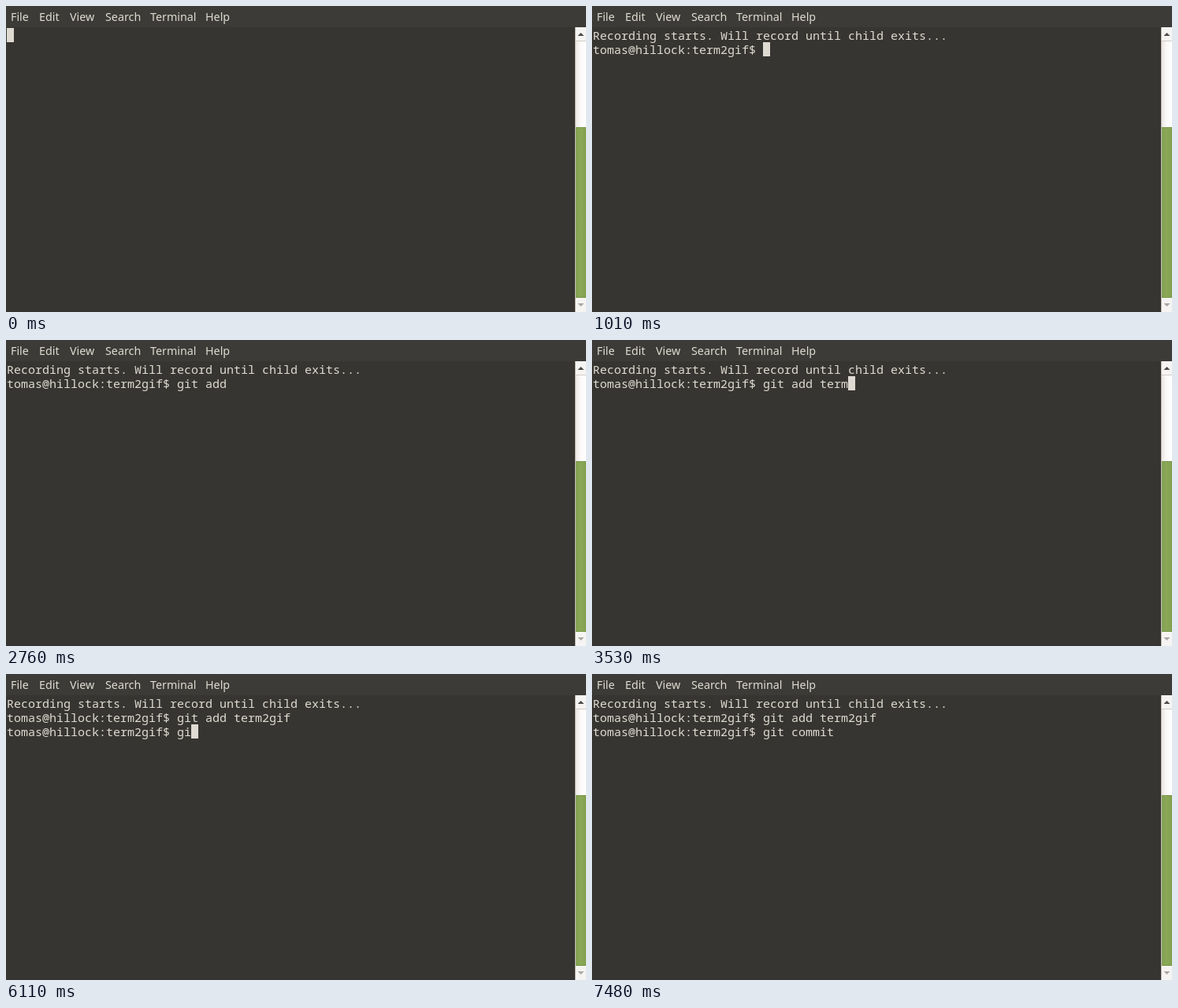
Write an HTML page with a canvas that moves like this. It is 736 by 389 pixels and loops after 8000 ms.

```html
<!DOCTYPE html>
<html lang="en">
<head>
<meta charset="utf-8">
<title>Terminal session</title>
<style>
  html, body { margin: 0; width: 100%; height: 100%; overflow: hidden; background: #373531; }
  canvas { display: block; }
</style>
</head>
<body>
<canvas id="stage" width="736" height="389"></canvas>
<script>
const ctx = document.getElementById('stage').getContext('2d');
const LOOP = 8000, CELL = 9, LINE = 18, LEFT = 1, TOP = 28;
const PROMPT = 'tomas@hillock:term2gif$ ';

// Time at which each piece of text reaches the screen
const output = [
  [40, 'Recording starts. Will record until child exits...\n'],
  [690, PROMPT],
  [1660, 'g'], [1800, 'i'], [1880, 't'], [2100, ' '],
  [2230, 'a'], [2420, 'd'], [2580, 'd'], [2670, ' '],
  [3100, 't'], [3280, 'e'], [3430, 'r'], [3530, 'm'], [4230, '2'], [4480, 'gif '],
  [5280, '\n' + PROMPT],
  [5960, 'g'], [6110, 'i'], [6180, 't'], [6240, ' '],
  [6460, 'c'], [6550, 'o'], [6640, 'm'], [6790, 'm'], [7310, 'i'], [7400, 't']
];

// The cursor starts visible and flips at each of these times
const blinks = [410, 1010, 1610, 2180, 2760, 3350, 3940, 4530, 5120, 5710, 6300, 6870, 7480];

const menu = [['File', 6], ['Edit', 42], ['View', 81], ['Search', 126], ['Terminal', 183], ['Help', 253]];

function rect(x, y, w, h, fill) {
  ctx.fillStyle = fill;
  ctx.fillRect(x, y, w, h);
}

function across(x0, x1, ...colors) {
  const g = ctx.createLinearGradient(x0, 0, x1, 0);
  colors.forEach((c, i) => g.addColorStop(i / (colors.length - 1), c));
  return g;
}

function arrow(y, dir, fill) {
  ctx.fillStyle = fill;
  ctx.beginPath();
  ctx.moveTo(725.5, y + 2 * dir);
  ctx.lineTo(733.5, y + 2 * dir);
  ctx.lineTo(729.5, y - 2 * dir);
  ctx.fill();
}

function drawMenu() {
  rect(0, 0, 736, 27, '#3c3b37');
  ctx.font = '14.3px "Noto Sans", "Open Sans", sans-serif';
  ctx.fillStyle = '#dfdbd2';
  for (const [label, x] of menu) ctx.fillText(label, x, 19);
}

function drawScrollbar() {
  rect(722, 27, 14, 362, across(722, 736, '#e9e3df', '#fbf9f8', '#ffffff'));
  rect(722, 27, 1, 362, '#c9c2bb');
  rect(723, 27, 13, 17, '#f6f4f2');
  rect(723, 44, 13, 1, '#d2cbc5');
  rect(723, 154, 13, 217, across(723, 736, '#84a154', '#8aa856', '#83a050'));
  rect(723, 154, 13, 1, '#789549');
  rect(723, 370, 13, 1, '#789549');
  rect(723, 371, 13, 18, '#f6f4f2');
  arrow(36, 1, '#4c4a46');
  arrow(380, -1, '#aaa6a1');
}

function drawTerminal(t) {
  rect(0, 27, 722, 362, '#373531');
  const lines = output.filter(([at]) => t >= at).map(([, s]) => s).join('').split('\n');
  ctx.font = '15px "Noto Sans Mono", "DejaVu Sans Mono", monospace';
  ctx.fillStyle = '#dfdbd2';
  lines.forEach((line, row) => ctx.fillText(line, LEFT, TOP + row * LINE + 15));

  if (blinks.filter(at => t >= at).length % 2 === 0) {
    const row = lines.length - 1;
    rect(LEFT + lines[row].length * CELL, TOP + row * LINE, CELL, LINE, '#dfdbd2');
  }
}

const start = performance.now();

function draw() {
  drawTerminal((performance.now() - start) % LOOP);
  drawMenu();
  drawScrollbar();
  requestAnimationFrame(draw);
}
draw();
</script>
</body>
</html>
```
